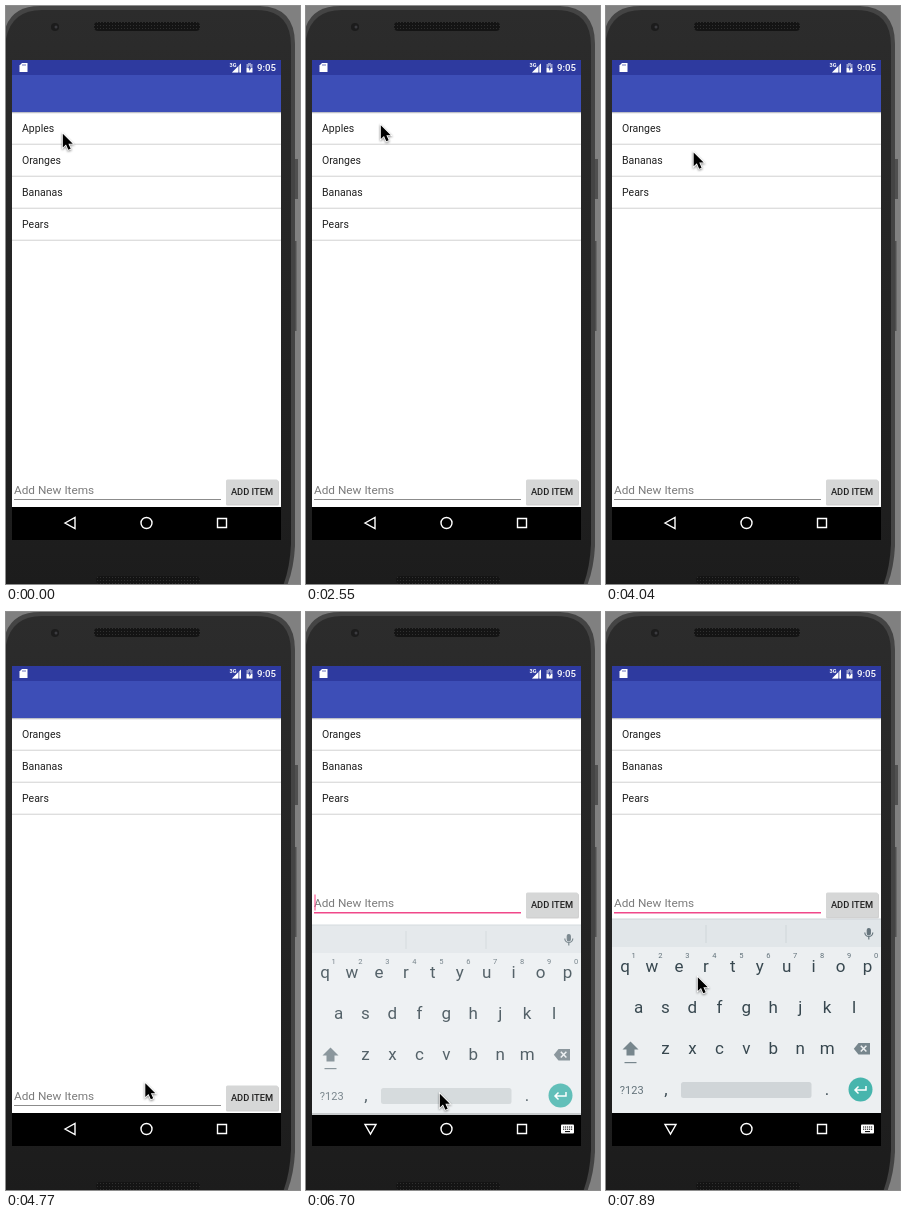
An HTML page that plays this animation: 294x578 px, repeating every 8 s.

```html
<!DOCTYPE html>
<html lang="en">
<head>
<meta charset="utf-8">
<title>Shopping list</title>
<style>
html, body { margin: 0; width: 100%; height: 100%; overflow: hidden; background: #808080; }
svg { display: block; width: 294px; height: 578px; }
text { font-family: Roboto, "Liberation Sans", sans-serif; fill: #212121; }
.row { font-size: 10.5px; }
.key { font-size: 17px; fill: #37474f; text-anchor: middle; }
.digit { font-size: 7.5px; fill: #607079; text-anchor: middle; }
.status { fill: #fff; }
.hint { font-size: 11.8px; fill: #7c7c7c; }
.mode { font-size: 11px; fill: #63727a; text-anchor: middle; }
.nav { fill: none; stroke: #fff; stroke-width: 1.4; }
#pointer { filter: drop-shadow(0 1px 1px #0007); }
</style>
</head>
<body>
<svg viewBox="0 0 294 578">
  <defs>
    <clipPath id="rowClip"><path d="M6 106h269v32H6z"/></clipPath>
    <clipPath id="screenClip"><path d="M6 54h269v449H6z"/></clipPath>
    <pattern id="mesh" width="3" height="3" patternUnits="userSpaceOnUse">
      <path d="M0 0h3v3H0z" fill="#141414"/><path d="M1 1h1v1H1z" fill="#303030"/>
    </pattern>
    <linearGradient id="shade" x2="0" y2="1">
      <stop stop-color="#9a9da8"/><stop offset="1" stop-color="#fff" stop-opacity="0"/>
    </linearGradient>
    <linearGradient id="body" x2="0" y2="1">
      <stop stop-color="#2c2c2c"/><stop offset="1" stop-color="#1c1c1c"/>
    </linearGradient>
  </defs>

  <!-- phone body -->
  <path fill="#808080" d="M0 0h294v578H0z"/>
  <path fill="#505050" d="M289 153h3v40h-3zM289 235h1.500v90H289z"/>
  <path fill="#444" d="M-3 36Q-1 0 34 0H252Q289 0 289 38V540Q288 562 281 580H-3z"/>
  <path fill="url(#body)" d="M-1 40Q2 4 36 4H250Q285 4 285 40V538Q284 562 277 580H-1z"/>
  <rect x="88" y="16" width="106" height="9" rx="4" fill="url(#mesh)"/>
  <rect x="90" y="570" width="104" height="8" rx="4" fill="url(#mesh)"/>
  <circle cx="49" cy="21" r="4" fill="#1c1c1c"/><circle cx="50" cy="21" r="1.5" fill="#3c3c40"/>

  <!-- app -->
  <path fill="#fff" d="M6 106h269v396H6z"/>
  <path fill="#2e3a9f" d="M6 54h269v15.500H6z"/>
  <path fill="#3d4eb7" d="M6 69h269v37H6z"/>
  <g fill="#fff">
    <path d="M16 57h5.500v9h-8v-6.500z"/>
    <path d="M17 58v2M19 58v2" stroke="#2e3a9f" stroke-width=".7"/>
    <text class="status" x="223.500" y="61" font-size="5.500" font-weight="700">3G</text>
    <path d="M235 57.500v9h-9z" opacity=".45"/><path d="M232 60.500v6h-6z"/><path d="M235 57.500v9h-1.500V59z"/>
    <path d="M242 57h3v1h1.500v4h-6v-4h1.500z" opacity=".5"/><path d="M240.500 62h6v4.500h-6z"/>
    <path d="M244 59l-2 3.200h1.300V65l2-3.500H244z" fill="#2e3a9f"/>
    <text class="status" x="251" y="65" font-size="9.600" font-weight="500">9:05</text>
  </g>
  <g id="press" clip-path="url(#rowClip)">
    <path fill="#e8eaec" d="M6 106h269v32H6z"/>
    <circle id="ripple" cx="85" cy="122" fill="#dfe1e3"/>
  </g>
  <g id="list"></g>
  <path fill="url(#shade)" d="M6 106h269v2.500H6z"/>
  <g id="entry">
    <text class="hint" x="8" y="488.300">Add New Items</text>
    <path id="line"/>
    <path id="caret" d="M8.500 475.500h1v16h-1z" fill="#ff4081"/>
    <rect x="220" y="474.500" width="53" height="25" rx="1.500" opacity=".18"/>
    <rect x="220" y="473.500" width="52" height="24.500" rx="1.500" fill="#d6d7d7"/>
    <text x="246" y="489" font-size="9.300" font-weight="500" text-anchor="middle">ADD ITEM</text>
  </g>

  <!-- navigation bar -->
  <path d="M6 501h269v33H6z"/>
  <g class="nav">
    <path id="back"/>
    <circle cx="140.500" cy="517" r="5.500"/>
    <path d="M211.500 512.500h9v9h-9z"/>
  </g>
  <g id="imeIcon">
    <rect x="255" y="512.500" width="13" height="9" rx="1" fill="#fff"/>
    <path d="M257 515h9.500M257 517.200h9.500" stroke="#000" stroke-dasharray="1.200 .8"/>
    <path d="M259 519.600h5" stroke="#000"/>
  </g>

  <!-- keyboard -->
  <g clip-path="url(#screenClip)"><g id="keyboard">
    <path fill="#eceff1" d="M6 307h269v194H6z"/>
    <path fill="#e1e6e9" d="M6 307h269v28H6z"/>
    <path fill="#d0d6d9" d="M6 306.500h269v1H6zM99.500 313h1v18h-1zM179.500 313h1v18h-1z"/>
    <g fill="none" stroke="#66757d" stroke-width="1.200">
      <rect x="261.300" y="316.500" width="3" height="6.500" rx="1.500" fill="#66757d"/>
      <path d="M258.800 320.500a4 4 0 0 0 8 0M262.800 324.500v3"/>
    </g>
    <g id="keys"></g>
    <g fill="#77868d">
      <path d="M24.500 429.500l8 8H28.500v6h-8v-6H16.500z"/>
      <path d="M18.500 450h12v1.200h-12z"/>
      <path d="M252.500 431H264v11.500h-11.500L247.800 436.700z"/>
    </g>
    <path d="M254.800 433.800l5.600 5.800m0-5.800l-5.600 5.800" stroke="#eceff1" stroke-width="1.500"/>
    <text class="mode" x="25.700" y="481.500">?123</text>
    <rect x="75" y="470" width="130.500" height="16" rx="2.500" fill="#d0d5d8"/>
    <circle cx="254.500" cy="477.500" r="12" fill="#47b5ad"/>
    <path d="M260 474v4h-11m3.500-3.500L249 478l3.500 3.500" fill="none" stroke="#fff" stroke-width="1.500"/>
  </g></g>

  <path id="pointer" d="M.8 1.200V15L4 12 6.300 17.300 8.700 16.300 6.400 11.200H10.800z"
        stroke="#fff" stroke-width="1.600" paint-order="stroke"/>
</svg>
<script>
const $ = id => document.getElementById(id);
const set = (id, attrs) => {
  for (const name in attrs) $(id).setAttribute(name, attrs[name]);
};
const show = (id, on) => set(id, { visibility: on ? 'visible' : 'hidden' });
const label = (cls, x, y, s) => `<text class="${cls}" x="${x}" y="${y}">${s}</text>`;
const ramp = (t, from, to) => Math.min(1, Math.max(0, (t - from) / (to - from)));
const mix = (a, b, p) => a + (b - a) * p;

// Movement is sampled about seven times a second
const sample = t => Math.max(0, Math.floor((t - 25) / 148) * 148 + 35);

// Pointer stops: time, x, y
const stops = [
  [0, 56, 126.5], [300, 55.5, 125.5], [2400, 55.5, 125.5], [2550, 74, 118],
  [3900, 74, 118], [4490, 176, 335], [4770, 138.5, 470], [5070, 138, 473.5],
  [5400, 138, 473.5], [5800, 133, 480.5], [6850, 133, 480.5], [7290, 111.5, 360],
  [7870, 91, 364]
];

function pointerAt(t) {
  const next = stops.findIndex(s => s[0] > t);
  if (next < 0) return stops.at(-1).slice(1);
  const [t0, x0, y0] = stops[next - 1], [t1, x1, y1] = stops[next];
  const p = ramp(t, t0, t1), eased = p * p * (3 - 2 * p);
  return [mix(x0, x1, eased), mix(y0, y1, eased)];
}

const keyRow = (cls, chars, x, y) =>
  [...chars].map((c, i) => label(cls, x + 26.95 * i, y, c)).join('');
$('keys').innerHTML =
  ['qwertyuiop', 'asdfghjkl', 'zxcvbnm'].map((chars, i) =>
    keyRow('key', chars, 19 + (10 - chars.length) * 13.5, 360 + 41 * i)).join('') +
  keyRow('digit', '1234567890', 27.5, 346) +
  label('key', 60, 483, ',') + label('key', 221, 483, '.');

let listed;
function showList(items) {
  if (listed === items.length) return;
  listed = items.length;
  $('list').innerHTML = items.map((name, i) =>
    label('row', 16, 126 + 32 * i, name) +
    `<rect x="6" y="${137.6 + 32 * i}" width="269" height="1.4" fill="#dedede"/>`).join('');
}

function draw(t) {
  const s = sample(t);
  set('pointer', { transform: `translate(${pointerAt(s)})` });

  const pressed = ramp(s, 2700, 2990);
  set('press', { opacity: pressed * (1 - ramp(s, 3290, 3740)) });
  set('ripple', { r: 19 * pressed });

  const fruit = ['Apples', 'Oranges', 'Bananas', 'Pears'];
  showList(t < 3290 ? fruit : fruit.slice(1));

  const focused = t >= 6400, typing = t >= 6550;
  set('line', focused
    ? { d: 'M8 493h207v1.6H8z', fill: '#f0488a' }
    : { d: 'M8 493h207v1H8z', fill: '#8c8c8c' });
  show('caret', focused && (t - 6390) % 1000 < 500);
  set('entry', { transform: `translate(0 ${typing ? -193 : 0})` });

  const risen = ramp(s, 6400, 6990);
  set('keyboard', {
    opacity: Math.min(1, risen * 1.7),
    transform: `translate(0 ${24 * (1 - risen) ** 2})`
  });
  show('imeIcon', typing);
  set('back', { d: typing ? 'M59 512.500h11l-5.500 9.500z' : 'M59 517l10-5.500v11z' });
}

function tick() {
  draw(performance.now() % 8000);
  requestAnimationFrame(tick);
}
tick();
</script>
</body>
</html>
```
